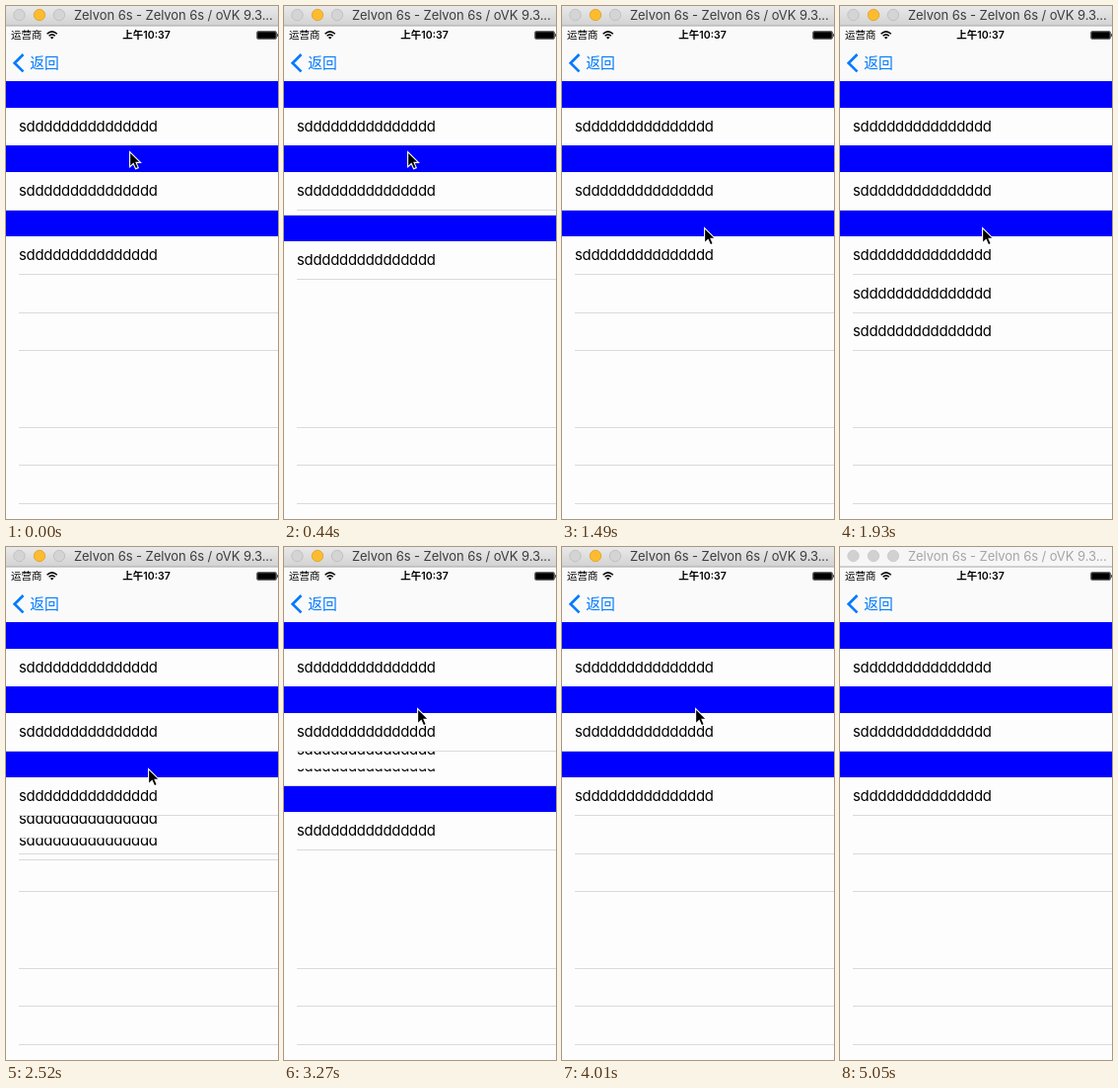
Recreate the animation shown at these times as an HTML page. Size 276 by 519 pixels, loop 5.15 s.

```html
<!DOCTYPE html>
<html lang="zh">
<head>
<meta charset="utf-8">
<style>
  html, body { margin: 0; width: 100%; height: 100%; overflow: hidden; background: #fdfdfd; }
  svg { display: block; }
  text { font-family: Inter, "Noto Sans CJK SC", "Noto Sans CJK", sans-serif; }
  .row { font-size: 14.9px; letter-spacing: -.25px; }
  .status { font-size: 10.5px; }
  #title { font-size: 13px; letter-spacing: -.07px; }
</style>
</head>
<body>
<svg id="stage" width="276" height="519" viewBox="0 0 276 519">
  <defs>
    <linearGradient id="chrome" x2="0" y2="1">
      <stop stop-color="#e9e9e9"/><stop offset="1" stop-color="#d2d2d2"/>
    </linearGradient>
  </defs>
  <rect width="276" height="519" fill="#fdfdfd"/>
  <g id="table"></g>

  <rect y="20" width="276" height="56" fill="#fafafa"/>
  <text class="status" x="5" y="33">运营商</text>
  <path d="M41.6 28.2Q46.7 23.6 51.8 28.2M43.6 30.3Q46.7 27.5 49.8 30.3" fill="none" stroke="#000" stroke-width="1.5"/>
  <path d="M44.9 31.8Q46.7 30.3 48.5 31.8L46.7 33.6Z"/>
  <text class="status" x="142.5" y="33" text-anchor="middle" font-weight="600">上午10:37</text>
  <rect x="254.5" y="25.5" width="20" height="8" rx="1.5" fill="#888" stroke="#555" stroke-width=".8"/>
  <rect x="255.3" y="26.2" width="18.4" height="6.6" rx=".7"/>
  <rect x="275" y="28" width="1" height="3" fill="#555"/>
  <path d="M17.5 49L8.7 57.7L17.5 66.4" fill="none" stroke="#007aff" stroke-width="2.7"/>
  <text x="24.2" y="63" font-size="14.8" fill="#007aff">返回</text>

  <rect id="bar" width="276" height="20"/>
  <rect y="19.5" width="276" height="1" fill="#aaa"/>
  <g id="buttons" stroke-width=".8">
    <circle cx="13.5" cy="9" r="5.7"/><circle cx="34" cy="9" r="5.7"/><circle cx="54" cy="9" r="5.7"/>
  </g>
  <text id="title" x="69" y="14">Zelvon 6s - Zelvon 6s / oVK 9.3...</text>

  <path id="cursor" d="M.6 .6V15.8L4.2 12.5L6.6 17.8L9.3 16.6L7 11.4H11.6Z" stroke="#fff" stroke-width="1.1"/>
</svg>
<script>
const LOOP = 5150, DURATION = 280;
const TOP = 77, HEADER = 26, ROW = 38.5, PITCH = 65;
const LINE = '#dadadd';
const $ = id => document.getElementById(id);

const ticks = [0, 300, 450, 590, 890, 1040, 1190, 1340, 1490, 1640, 1790, 1930,
  2520, 2670, 2820, 2970, 3270, 3410, 3710, 3860, 4010, 4160, 4300, 4450, 4600, 4750, 5050];

const toggles = [
  { section: 1, open: 255, close: 857 },
  { section: 2, open: 1595, close: 2396 },
  { section: 1, open: 3138, close: 3670 },
];

const moves = [
  { start: 1190, end: 1490, from: [125, 147], to: [144, 224] },
  { start: 2670, end: 2970, from: [144, 224], to: [135, 163] },
  { start: 4010, end: 4750, from: [135, 163], to: [254, 530] },
];

const clamp = x => Math.min(1, Math.max(0, x));
const ease = x => x * x * (3 - 2 * x);
const progress = (t, start, length) => ease(clamp((t - start) / length));

function add(parent, tag, attributes, text = '') {
  const node = document.createElementNS('http://www.w3.org/2000/svg', tag);
  for (const key in attributes) node.setAttribute(key, attributes[key]);
  node.textContent = text;
  return parent.appendChild(node);
}

const separator = (parent, y, x = 13) => add(parent, 'rect', { x, y, width: 276 - x, height: 1, fill: LINE });
const show = (node, visible) => node.setAttribute('visibility', visible ? 'visible' : 'hidden');
const place = (node, x, y) => node.setAttribute('transform', `translate(${x} ${y})`);

function makeRow(parent) {
  const group = add(parent, 'g', {});
  add(group, 'rect', { width: 276, height: ROW, fill: '#fdfdfd' });
  add(group, 'text', { class: 'row', x: 13, y: 24 }, 's' + 'd'.repeat(15));
  return { group, line: separator(group, 38) };
}

// The last header sits half a point lower, so the separator above it shows.
function makeSection(index) {
  const group = add($('table'), 'g', {});
  const rows = [2, 1, 0].map(() => makeRow(group)).reverse();
  add(group, 'rect', { y: -1, width: 276, height: HEADER + 1, fill: '#00f' });
  if (index === 2) separator(group, -1, 0);
  return { group, rows };
}

const sections = [0, 1, 2].map(makeSection);
const spareLines = [310, 348].map(y => separator($('table'), y));
[426, 464, 503].forEach(y => separator($('table'), y));

function drawTable(t) {
  const active = toggles.findLast(({ open }) => t >= open);
  const closing = !active || t >= active.close;
  const grown = !active ? 0 : closing
    ? 1 - progress(t, active.close, DURATION)
    : progress(t, active.open, DURATION);
  const extra = Math.round(grown * 2 * ROW);

  sections.forEach(({ group, rows }, i) => {
    const own = active && active.section === i ? extra : 0;
    const pushed = active && active.section < i ? extra : 0;
    place(group, 0, TOP + i * PITCH + pushed);
    rows.forEach(({ group, line }, k) => {
      place(group, 0, HEADER + Math.round(k * own / 2));
      show(group, !k || own);
      const covered = (k === 0 && i === 1 && closing && own) || (k === 1 && own < 60);
      show(line, !covered && (k || own || i === 2));
    });
  });
  spareLines.forEach(line => show(line, closing));
}

function drawCursor(t) {
  const { start, end, from, to } = moves.findLast(move => t >= move.start) || moves[0];
  const p = clamp((t - start) / (end - start));
  place($('cursor'), ...from.map((value, i) => value + (to[i] - value) * p));
}

function drawTitleBar(focused) {
  $('bar').setAttribute('fill', focused ? 'url(#chrome)' : '#f6f6f6');
  $('title').setAttribute('fill', focused ? '#3c3c3c' : '#a5a5a5');
  [...$('buttons').children].forEach((button, i) => {
    const lit = focused && i === 1;
    button.setAttribute('fill', lit ? '#fdbc2f' : focused ? '#d4d4d4' : '#d1d1d1');
    button.setAttribute('stroke', lit ? '#dfa023' : focused ? '#bcbcbc' : '#c9c9c9');
  });
}

function frame() {
  const now = performance.now() % LOOP;
  const t = ticks.findLast(tick => tick <= now);
  drawTable(t);
  drawCursor(t);
  drawTitleBar(t < 5050);
  requestAnimationFrame(frame);
}
frame();
</script>
</body>
</html>
```
